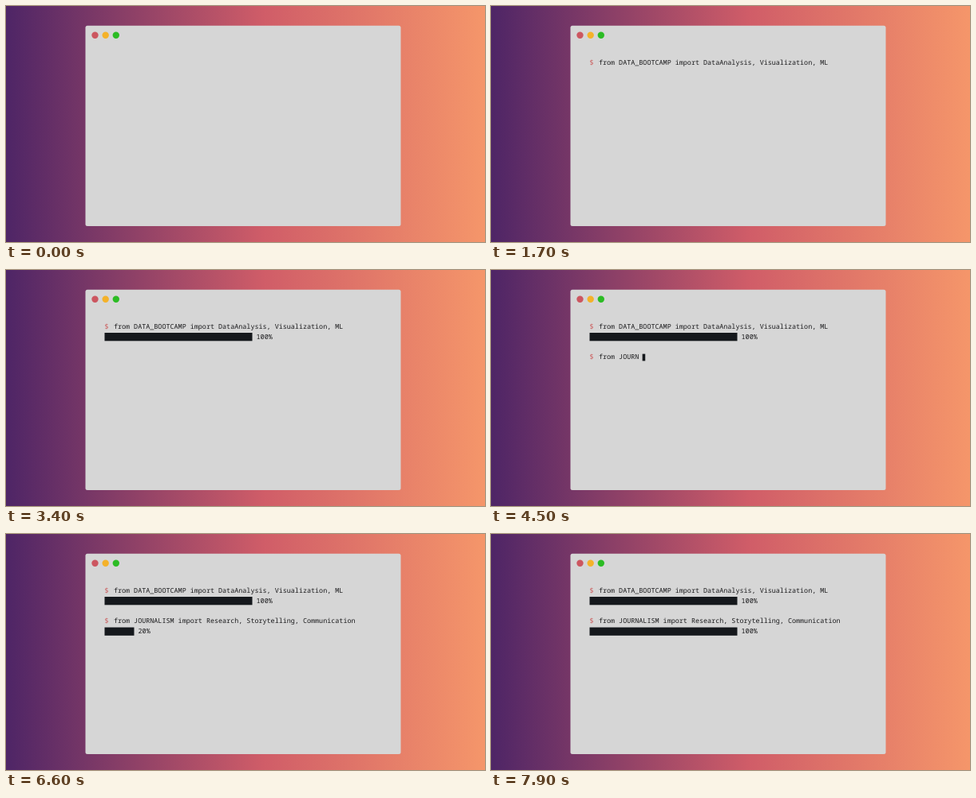
Recreate the animation shown at these times as an HTML page. Size 600 by 297 pixels, loop 8 s.

```html
<!DOCTYPE html>
<html lang="en">
<head>
<meta charset="utf-8">
<title>Terminal</title>
<style>
  html, body { margin: 0; width: 100%; height: 100%; overflow: hidden; }
  body { background: linear-gradient(90deg, #4e2566, #d05d68 54%, #f5966a); }
  svg { display: block; width: 600px; height: 297px; }
  text {
    font: 8.42px "Noto Sans Mono", "DejaVu Sans Mono", monospace;
    fill: #1b1b1d; white-space: pre; text-rendering: geometricPrecision;
  }
  .prompt { fill: #cb5c5c; }
  .bar { fill: #15181c; }
</style>
</head>
<body>
<svg viewBox="0 0 600 297">
  <rect x="99.5" y="24.7" width="395" height="252.3" rx="2.5" fill="#d6d6d6"/>
  <circle cx="111.5" cy="36.8" r="4.2" fill="#cc5660"/>
  <circle cx="124.7" cy="36.8" r="4.2" fill="#f4b22a"/>
  <circle cx="137.8" cy="36.8" r="4.2" fill="#2cbc24"/>
</svg>
<script>
const LOOP = 8000, STEP = 28, CHAR = 5.052, LEFT = 123.5, TEXT_LEFT = 134.9;
const CELLS = 40, CELL = 4.625;
const svg = document.querySelector("svg");

function add(tag, attrs) {
  const el = document.createElementNS("http://www.w3.org/2000/svg", tag);
  for (const key in attrs) el.setAttribute(key, attrs[key]);
  return svg.appendChild(el);
}

// Each command is typed, then its progress bar fills one cell per step.
const commands = [
  { code: "from DATA_BOOTCAMP import DataAnalysis, Visualization, ML",
    y: 73.8, start: 75, load: 2175 },
  { code: "from JOURNALISM import Research, Storytelling, Communication",
    y: 112.3, start: 4210, load: 6372 }
];

for (const c of commands) {
  c.prompt = add("text", { x: LEFT, y: c.y, class: "prompt" });
  c.prompt.textContent = "$";
  c.line = add("text", { x: TEXT_LEFT, y: c.y });
  c.cursor = add("rect", { y: c.y - 6.7, width: 3.6, height: 8.8, class: "bar" });
  c.bar = add("rect", { x: LEFT, y: c.y + 5.2, height: 10.3, class: "bar" });
  c.percent = add("text", { y: c.y + 13.1 });
}

const steps = (time, max) => Math.max(0, Math.min(max, Math.floor(time / STEP)));
const show = (el, on) => el.setAttribute("visibility", on ? "visible" : "hidden");

function draw(c, t) {
  const age = t - c.start;
  const typed = steps(age, c.code.length);
  const cells = steps(t - c.load, CELLS);

  show(c.prompt, age >= 0);
  c.line.textContent = c.code.slice(0, typed);
  c.cursor.setAttribute("x", TEXT_LEFT + typed * CHAR + 4.2);
  show(c.cursor, age >= 0 && t < c.load && age % 1000 < 500);

  c.bar.setAttribute("width", cells * CELL);
  c.percent.setAttribute("x", LEFT + cells * CELL + CHAR);
  c.percent.textContent = cells ? Math.round(cells / CELLS * 100) + "%" : "";
}

const origin = performance.now();
function frame() {
  const t = (performance.now() - origin) % LOOP;
  commands.forEach(c => draw(c, t));
  requestAnimationFrame(frame);
}
frame();
</script>
</body>
</html>
```
